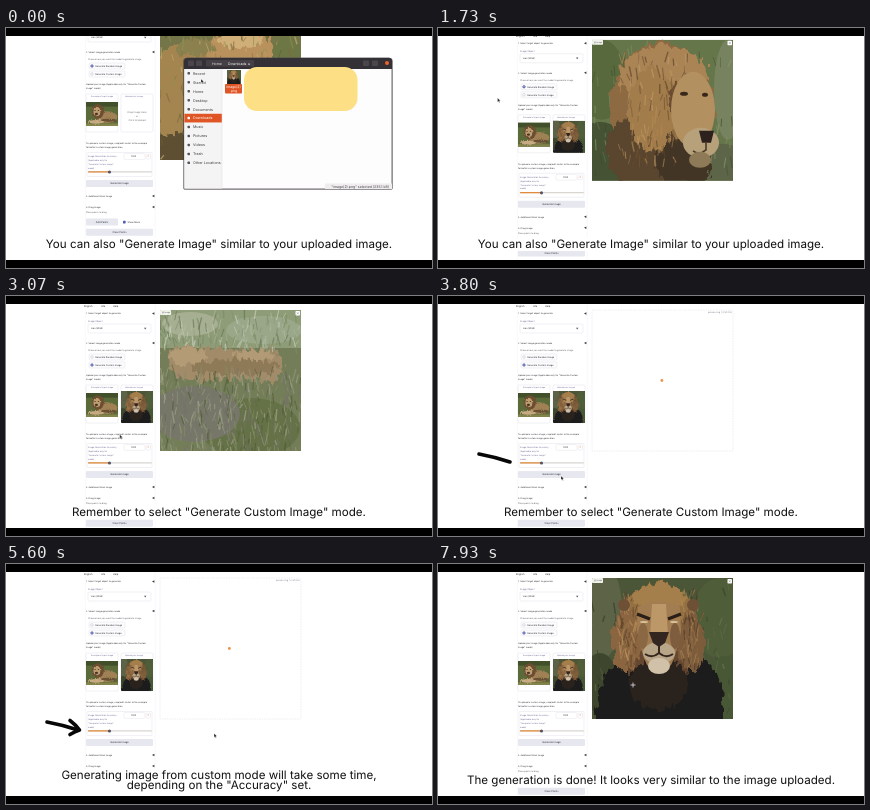
An HTML page for the animation above (8000 ms loop, 426 px wide and 240 px high).

```html
<!DOCTYPE html>
<html lang="en">
<head>
<meta charset="utf-8">
<title>Custom image generation</title>
<style>
html, body { margin: 0; width: 100%; height: 100%; overflow: hidden; background: #000; }
#stage { display: block; width: 100vw; height: 100vh; }
text { font-family: Inter, "Open Sans", sans-serif; text-rendering: geometricPrecision; white-space: pre; }
</style>
</head>
<body>
<svg id="stage" viewBox="0 0 426 240" xmlns="http://www.w3.org/2000/svg"></svg>
<script>
const LOOP = 8000, STEP = 200 / 3;

const text = (x, y, s, size = 2.2, fill = '#34343c', anchor = 'start', extra = '') =>
  `<text x="${x}" y="${y}" font-size="${size}" fill="${fill}" text-anchor="${anchor}" ${extra}>${s}</text>`;
const rect = (x, y, w, h, fill, extra = '') =>
  `<rect x="${x}" y="${y}" width="${w}" height="${h}" fill="${fill}" ${extra}/>`;
const oval = (x, y, rx, ry, fill, extra = '') =>
  `<ellipse cx="${x}" cy="${y}" rx="${rx}" ry="${ry}" fill="${fill}" ${extra}/>`;
const path = (d, fill, extra = '') => `<path d="${d}" fill="${fill}" ${extra}/>`;
const frame = (x, y, w, h, fill = '#fff') =>
  rect(x, y, w, h, fill, 'rx="1" stroke="#e3e3ea" stroke-width=".5"');

function random(seed) {
  return () => (seed = (seed * 16807) % 2147483647) / 2147483647;
}

// Loose strands inside a box of a 141-unit picture
function blades(seed, n, [left, top, right, bottom], colours) {
  const rnd = random(seed * 7919);
  let out = '';
  for (let i = 0; i < n; i++) {
    const x = left + rnd() * (right - left), y = top + rnd() * (bottom - top), h = 4 + rnd() * 9;
    const c = colours[Math.floor(rnd() * colours.length)];
    out += `<path d="M${x.toFixed(1)} ${y.toFixed(1)}l${((rnd() - .5) * 7).toFixed(1)} ${(-h).toFixed(1)}" stroke="${c}" stroke-width="${(.5 + rnd()).toFixed(1)}" opacity=".65"/>`;
  }
  return out;
}

const fur = s => `<g filter="url(#fur)">${s}</g>`;
const soft = s => `<g filter="url(#soft)">${s}</g>`;

const pictures = {
  lying: rect(0, 0, 141, 141, '#747548') + fur(
    oval(25, 75, 38, 52, '#a58550') + oval(82, 35, 34, 28, '#b8915b') +
    oval(80, 20, 22, 9, '#cfae78') + oval(15, 130, 28, 16, '#5e5033') +
    oval(35, 28, 20, 9, '#8a8150') + oval(126, 40, 16, 24, '#6d7644')) +
    blades(11, 140, [0, 10, 141, 141], ['#c1ad75', '#806b40', '#8c914f', '#56552f']),

  profile: rect(0, 0, 141, 141, '#66764b') + soft(
    oval(10, 40, 24, 40, '#57693d') + oval(8, 118, 30, 36, '#465234') +
    oval(136, 50, 14, 50, '#77825f') + oval(128, 130, 36, 26, '#5d6548')) +
    blades(5, 110, [0, 12, 141, 141], ['#8b9a6c', '#3f4d2c', '#7e8b60']) + fur(
    oval(70, 68, 52, 66, '#8d6a43') + oval(50, 112, 36, 38, '#5a442d') +
    oval(72, 36, 44, 30, '#aa8454') + oval(60, 70, 24, 42, '#a27c4b') +
    oval(92, 124, 28, 26, '#433527') + oval(84, 58, 7, 16, '#6b4c30')) +
    blades(17, 130, [28, 22, 96, 130], ['#c19b66', '#73532f', '#b48b53', '#59432c']) + soft(
    oval(101, 70, 22, 38, '#b3905f') + oval(109, 103, 18, 15, '#b7a17b') +
    path('M107 91l15 0-3 12-9 0z', '#2c211d') +
    oval(92, 54, 4, 2, '#38281b') + oval(113, 55, 3, 2, '#38281b') +
    path('M114 103v7q-7 6-13 1', 'none', 'stroke="#4a3829" stroke-width="1.6"') +
    oval(108, 120, 11, 8, '#8f7a58')),

  meadow: rect(0, 0, 141, 141, '#737e59') + soft(
    rect(0, 0, 141, 38, '#8e9c78') + oval(30, 14, 28, 12, '#a7af92') +
    oval(104, 20, 38, 14, '#9aa889') + oval(90, 118, 50, 30, '#657248') +
    oval(35, 104, 45, 28, '#767768')) +
    blades(7, 150, [0, 8, 141, 44], ['#d0d5c2', '#667652', '#aebaa0', '#7d8c65']) + fur(
    path('M9 44Q15 33 36 37Q80 41 116 39Q125 44 122 60L118 72Q70 65 43 72L18 68Q8 62 9 44z', '#a28b69') +
    oval(29, 46, 18, 9, '#b39b76') + oval(75, 57, 43, 8, '#8f7a59') +
    oval(96, 45, 22, 5, '#b29a76')) +
    blades(23, 420, [0, 66, 141, 150], ['#a4a58d', '#505e35', '#848d65', '#76706e', '#92977d']),

  portrait: rect(0, 0, 141, 141, '#4b5638') + soft(
    oval(8, 32, 22, 50, '#5d6347') + oval(128, 40, 28, 40, '#4f5d39') +
    oval(8, 105, 18, 30, '#3e472d') + oval(132, 112, 22, 34, '#485735')) +
    blades(3, 100, [0, 10, 141, 141], ['#6d7450', '#353f27', '#5f6943']) + fur(
    path('M4 145Q2 91 38 78L108 80Q137 97 130 145z', '#1b1c1b') +
    oval(66, 58, 43, 52, '#654630') + oval(67, 40, 36, 35, '#94703f') +
    oval(34, 62, 14, 32, '#8a6540') + oval(99, 63, 13, 30, '#7d5b3b') +
    oval(67, 106, 29, 26, '#2c241e') + oval(67, 20, 26, 14, '#a57f4b')) +
    blades(29, 70, [28, 18, 44, 95], ['#bd9460', '#5c412b', '#a47c4c']) +
    blades(31, 70, [90, 18, 106, 95], ['#ae8857', '#4d3726', '#94704a']) + soft(
    oval(32, 27, 6, 6, '#6d5036') + oval(101, 27, 6, 6, '#6d5036') +
    path('M46 29Q67 18 88 29L89 53Q84 78 79 87Q67 97 55 87Q49 75 45 52z', '#a37d52') +
    path('M60 26L74 26 76 58 58 58z', '#bc9868') +
    oval(51, 58, 5, 13, '#8b6844') + oval(83, 58, 5, 13, '#7d5d3e') +
    oval(67, 75, 16, 11, '#b9a688') + oval(67, 88, 11, 8, '#d0c1a8') +
    path('M57 54L77 54 73 65 67 69 61 65z', '#33251f') +
    path('M67 68V75Q60 81 53 76M67 75Q74 81 81 76', 'none', 'stroke="#35261e" stroke-width="2"') +
    path('M45 36L58 41M89 36L76 41', 'none', 'stroke="#2a1e16" stroke-width="3.4"') +
    oval(52, 44, 4, 1.1, '#d8c29c') + oval(82, 44, 4, 1.1, '#d8c29c')),

  resting: rect(0, 0, 141, 141, '#5a6a38') + soft(
    rect(0, 0, 141, 38, '#424f2b') + rect(0, 112, 141, 29, '#83834b')) + fur(
    oval(92, 84, 47, 26, '#a08154') + oval(52, 60, 27, 32, '#6d4d30') +
    oval(48, 60, 15, 20, '#bd9d70') + oval(45, 105, 36, 8, '#c8ab82') +
    oval(100, 98, 34, 7, '#685035')) + soft(
    oval(46, 70, 7, 5, '#43312a') + oval(40, 55, 4, 2, '#3d2c20') + oval(55, 55, 4, 2, '#3d2c20'))
};

const place = (name, x, y, w, h = w, id = '') =>
  `<svg ${id && `id="${id}"`} x="${x}" y="${y}" width="${w}" height="${h}" viewBox="0 0 141 141" preserveAspectRatio="xMidYMid slice">${pictures[name]}</svg>`;

const fold = y => path(`M148.4 ${y - 1.3}v2.6l-2.4-1.3z`, '#33333b');
const section = (y, s) => text(80, y + .8, s) + fold(y);
const purple = '#77709b';

function radio(id, y, s) {
  return frame(83, y - 3, 36, 6, '#fcfcfe') +
    `<circle cx="86" cy="${y}" r="1.3" fill="#fff" stroke="#a9aab5" stroke-width=".4"/>` +
    `<circle id="${id}" cx="86" cy="${y}" r="1.05" fill="#fff" stroke="#4554aa" stroke-width="1"/>` +
    text(89, y + .8, s, 2.35);
}
const button = (x, y, w, h, s) =>
  rect(x, y, w, h, '#e6e7ef', 'rx="1"') + text(x + w / 2, y + h / 2 + .9, s, 2.45, '#30303a', 'middle');

const panel =
  path('M79.3 0V240M149.2 0V240', 'none', 'stroke="#ececf1" stroke-width=".4"') +
  text(78, 10.9, 'English', 2.5) + text(95, 10.9, 'Info', 2.4) + text(107, 10.9, 'Help', 2.4) +
  section(17.5, '1. Select target object to generate') +
  text(82, 25.8, 'Image Object', 2.3, purple) + frame(82, 28, 63, 9) +
  text(85, 33.3, 'Lion (Wild)', 2.3) + path('M138 31.8h2.4l-1.2 1.6z', '#555') +
  section(47, '2. Select image generation mode') +
  text(82, 54.8, 'Choose how you want the model to generate image', 2.2, '#66646f') +
  radio('pickRandom', 61, 'Generate Random Image') + radio('pickCustom', 69, 'Generate Custom Image') +
  text(80, 79.9, 'Upload your image (Applicable only for "Generate Custom') + text(80, 84.3, 'Image" mode)') +
  frame(80, 89, 32, 38) + frame(115, 89, 32, 38) +
  text(85, 92, 'Example of input image', 2, purple) + text(119, 92, 'Upload your image', 2, purple) +
  place('resting', 80, 97, 32, 24) +
  `<g id="drop">${text(131, 108, 'Drop Image Here', 2.4, '#777', 'middle')}${text(131, 112, '- or -', 2.2, '#777', 'middle')}${text(131, 116, 'Click to Upload', 2.4, '#777', 'middle')}</g>` +
  place('portrait', 115, 95, 32, 32, 'upload') +
  text(80, 138.8, 'To upload a custom image, crop/edit similar to the example') +
  text(80, 142.9, 'for better custom image generation.') +
  frame(81, 147.5, 65, 24) +
  text(82, 152, 'Image Generation Accuracy', 2.2, purple) +
  text(82, 156, '(Applicable only for', 2.1, purple) + text(82, 160, '"Generate Custom Image"', 2.1, purple) +
  text(82, 163.6, 'mode)', 2.1, purple) +
  frame(118, 148.6, 21, 5.8) + text(125, 152.3, '1000', 2.3) +
  frame(140, 149, 4.5, 5) + text(142.2, 152.3, '↺', 2.4, '#e48945', 'middle') +
  rect(82, 166.3, 64, 1.2, '#d9d6d2', 'rx=".6"') + rect(82, 166.3, 21, 1.2, '#e18a3d', 'rx=".6"') +
  `<circle cx="103.5" cy="167" r="1.6" fill="#5a5365"/>` +
  button(80, 175, 67, 7, 'Generate Image') +
  section(191, '3. Additional Mask Image') + section(202, '4. Drag Image') +
  text(80, 208, 'Place points to drag', 2.2, '#66646f') +
  button(80, 213.5, 32, 7, 'Add Points') + rect(117, 215.8, 2.6, 2.6, '#4f5bb0', 'rx=".4"') +
  text(121.5, 218, 'Show Mask', 2.3) + button(80, 223.7, 67, 7, 'Clear Points');

const loader =
  rect(154, 14, 141, 141, '#fff', 'rx="1" stroke="#dcdce6" stroke-width=".5" stroke-dasharray="1.5 1"') +
  '<circle id="spin" cx="223.5" cy="84.5" r="1.4" fill="#ee9448"/>' +
  text(294, 17.2, '', 2.3, '#8a8490', 'end', 'id="timer"');

const badge = rect(154, 14, 11, 5, '#f1f2ec', 'rx=".8"') + text(156, 17.4, '▧ Image', 2, '#65656b') +
  rect(289.5, 15, 4.5, 4.5, '#fff', 'rx=".8"') +
  path('M290.8 16.3l2 2m0-2l-2 2', 'none', 'stroke="#666" stroke-width=".4"');

const places = ['Recent', 'Starred', 'Home', 'Desktop', 'Documents', 'Downloads', 'Music', 'Pictures', 'Videos', 'Trash', 'Other Locations'];
const dialog = rect(177, 30, 210, 132, '#000', 'opacity=".22" rx="3" filter="url(#soft)"') +
  path('M178 161V33Q178 30 181 30H383Q386 30 386 33V161z', '#fdfdfd', 'stroke="#4a464b" stroke-width=".8"') +
  path('M178 41V33Q178 30 181 30H383Q386 30 386 33V41z', '#343136') +
  rect(178.4, 41, 37.6, 119.5, '#f5f4f4') + rect(215.8, 41, .4, 120, '#d7d4d4') +
  [182, 190, 357, 366].map(x => rect(x, 32.5, 6, 5.5, '#4a464c', 'rx="1"')).join('') +
  rect(200, 32, 48, 6.5, '#444046', 'rx="1"') +
  text(206, 36.5, 'Home', 3.5, '#e9e6e6') + text(222, 36.5, 'Downloads  ▸', 3.5, '#fff') +
  '<circle cx="381" cy="35" r="2" fill="#e9642e"/>' +
  places.map((s, i) => {
    const y = 45.3 + i * 8.95, on = i === 5;
    return (on ? rect(178.4, y - 4.3, 37.4, 8.7, '#df5525') : '') +
      rect(181.5, y - 1.2, 2.5, 2.5, on ? '#fff' : '#56545a', 'rx=".7"') +
      text(187, y + 1.4, s, 3.7, on ? '#fff' : '#3f3d42');
  }).join('') +
  place('portrait', 221, 42, 14) + rect(219, 56, 17, 9.5, '#df5525', 'rx="1"') +
  text(227.5, 60, 'image(2)', 3.4, '#fff', 'middle') + text(227.5, 64, '.png', 3.4, '#fff', 'middle') +
  rect(319, 155.5, 67, 5.5, '#efeded') + text(383, 159.6, '"image(2).png" selected (235.1 kB)', 3.5, '#47434a', 'end');

const shaft = 'M41 158Q57 161 72 166', head = 'M64 156.5Q70 161 73.5 166Q69 167.5 64 170.5';
const ink = (id, d) => path(d, 'none', `id="${id}" pathLength="1" stroke="#070707" stroke-width="3.6" stroke-linecap="round" stroke-linejoin="round"`);

document.getElementById('stage').innerHTML = `
<defs>
  <filter id="soft" x="-5%" y="-5%" width="110%" height="110%"><feGaussianBlur stdDeviation=".7"/></filter>
  <filter id="fur" x="-10%" y="-10%" width="120%" height="120%">
    <feTurbulence type="fractalNoise" baseFrequency=".22 .1" numOctaves="2" seed="4" result="n"/>
    <feDisplacementMap in="SourceGraphic" in2="n" scale="14" xChannelSelector="R" yChannelSelector="G"/>
    <feGaussianBlur stdDeviation=".6"/>
  </filter>
  <clipPath id="view"><rect y="8" width="426" height="224"/></clipPath>
</defs>
${rect(0, 0, 426, 240, '#000')}
<g clip-path="url(#view)">
  ${rect(0, 8, 426, 224, '#fff')}
  <g id="page">${panel}
    ${['lying', 'profile', 'meadow', 'portrait'].map(n => place(n, 154, 14, 141, 141, n)).join('')}
    <g id="loader">${loader}</g><g id="badge">${badge}</g>
  </g>
  <g id="dialog">${dialog}</g>
  ${rect(238, 39, 113.5, 44, '#fddf86', 'rx="13" id="cover"')}
  <g id="arrow">${ink('shaft', shaft)}${ink('head', head)}</g>
  <g id="cursor">
    ${path('M0 0V4L1 3.1 1.7 4.6 2.4 4.3 1.7 2.8H3z', '#111', 'id="pointer" stroke="#fff" stroke-width=".35"')}
    ${path('M-2.5 0H2.5M0-2.5V2.5', 'none', 'id="cross" stroke="#dfe3ed" stroke-width=".8"')}
  </g>
  ${rect(30, 0, 366, 0, '#fff', 'id="plate"')}
  ${text(213, 220, '', 11.62, '#111', 'middle', 'id="line1"')}
  ${text(213, 225, '', 11.62, '#111', 'middle', 'id="line2"')}
</g>`;

const $ = id => document.getElementById(id);
const show = (id, on) => $(id).setAttribute('display', on ? 'inline' : 'none');
const ramp = (t, a, b) => Math.min(1, Math.max(0, (t - a) / (b - a)));
const ease = p => p * p * (3 - 2 * p);

const captions = [
  [0, 'You can also "Generate Image" similar to your uploaded image.'],
  [1800, 'Remember to select "Generate Custom Image" mode.'],
  [4330, 'Generating image from custom mode will take some time,', 'depending on the "Accuracy" set.'],
  [6330, 'The higher the accuracy, the longer the generation takes.'],
  [7400, 'The generation is done! It looks very similar to the image uploaded.']
];
// start, end, x, y of each cursor move
const moves = [
  [0, 0, 195, 51], [450, 930, 53, 70], [1500, 2200, 98.5, 70.5],
  [2700, 3330, 123, 180], [3900, 4600, 208, 169.5], [7400, 7800, 195, 121]
];

function cursorAt(t) {
  let [, , x, y] = moves[0];
  for (const [a, b, nx, ny] of moves.slice(1)) {
    const p = ease(ramp(t, a, b));
    x += (nx - x) * p;
    y += (ny - y) * p;
  }
  return [x, y];
}

function stroke(id, p) {
  show(id, p > 0);
  $(id).setAttribute('stroke-dasharray', p < 1 ? `${p} 2` : 'none');
}

function caption(t) {
  const [, first, second = ''] = captions.filter(c => t >= c[0]).pop();
  $('line1').textContent = first;
  $('line1').setAttribute('y', second ? 214.5 : 220);
  $('line2').textContent = second;
  $('plate').setAttribute('y', second ? 205 : 210);
  $('plate').setAttribute('height', second ? 27 : 13);
}

function draw(t) {
  const uploaded = t >= 600, custom = t >= 2270, loading = t >= 3400 && t < 7400, done = t >= 7400;
  $('page').setAttribute('transform', `translate(0 ${-23 * (1 - ease(ramp(t, 1400, 1730)))})`);
  show('dialog', !uploaded);
  show('cover', t < 1270);
  show('drop', !uploaded);
  show('upload', uploaded);
  show('lying', !uploaded);
  show('profile', uploaded && t < 1730);
  show('meadow', t >= 1730 && t < 3400);
  show('portrait', done);
  show('loader', loading);
  show('badge', !loading);
  show('pickRandom', !custom);
  show('pickCustom', custom);

  $('timer').textContent = `processing | ${((t - 3400) / 1000 + .1).toFixed(1)}/14.9s`;
  $('spin').setAttribute('cx', 223.5 + Math.sin(t / 180) * .5);

  show('arrow', t >= 3600 && !done);
  stroke('shaft', ramp(t, 3600, 3800));
  stroke('head', ramp(t, 3810, 4000));

  const [x, y] = cursorAt(t);
  $('cursor').setAttribute('transform', `translate(${x} ${y})`);
  show('cross', t >= 7600);
  show('pointer', t < 7600);
  caption(t);
}

let last = -1;
function tick() {
  const t = Math.floor((performance.now() % LOOP) / STEP + .001) * STEP;
  if (t !== last) draw(last = t);
  requestAnimationFrame(tick);
}
tick();
</script>
</body>
</html>
```
